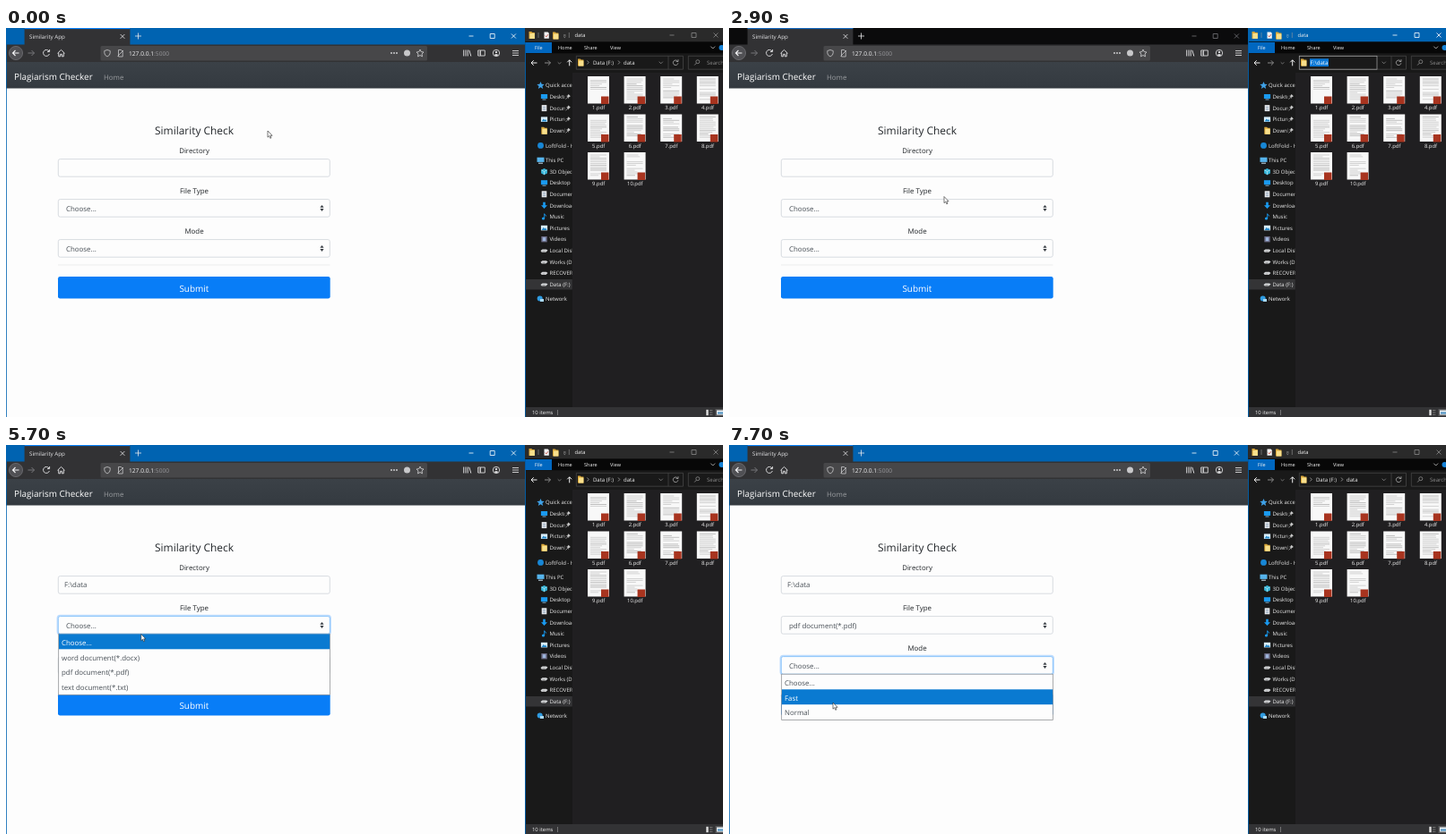
These frames come from a looping animation (800x435 px, 8 s). An HTML page:

```html
<!DOCTYPE html>
<html lang="en">
<head>
<meta charset="utf-8">
<title>Similarity App</title>
<style>
  html, body { margin: 0; width: 100%; height: 100%; overflow: hidden; background: #fdfdfd; }
  svg { display: block; width: 100vw; height: 100vh; }
  text { font-family: 'Open Sans', 'Noto Sans', sans-serif; text-rendering: geometricPrecision; white-space: pre; }
</style>
</head>
<body>
<svg id="stage" viewBox="0 0 800 435" preserveAspectRatio="none">
  <defs>
    <linearGradient id="nav" x2="0" y2="1"><stop stop-color="#3b4147"/><stop offset="1" stop-color="#343a40"/></linearGradient>
    <clipPath id="pane"><path d="M579 50H631.5V424H579Z"/></clipPath>
    <clipPath id="pinned"><path d="M579 50H623.5V424H579Z"/></clipPath>
  </defs>
</svg>
<script>
const stage = document.getElementById('stage');
const BLUE = '#0063b1', LIGHT = '#e8e8ea', INK = '#212529', GREY = '#495057';

function el(tag, attrs, parent = stage) {
  const n = document.createElementNS('http://www.w3.org/2000/svg', tag);
  set(n, attrs);
  parent.append(n);
  return n;
}
function set(n, attrs) { for (const k in attrs) n.setAttribute(k, attrs[k]); }
function show(n, on) { n.setAttribute('visibility', on ? 'visible' : 'hidden'); }
const group = (attrs = {}, parent) => el('g', attrs, parent);
const rect = (x, y, width, height, fill, parent, more) => el('rect', { x, y, width, height, fill, ...more }, parent);
const line = (d, stroke, parent, w = 0.8) => el('path', { d, stroke, fill: 'none', 'stroke-width': w }, parent);
const shape = (d, fill, parent) => el('path', { d, fill }, parent);
const dot = (cx, cy, r, fill, parent, more) => el('circle', { cx, cy, r, fill, ...more }, parent);
function text(x, y, str, size, fill, parent, anchor = 'start') {
  const n = el('text', { x, y, 'font-size': size, fill, 'text-anchor': anchor }, parent);
  n.textContent = str;
  return n;
}
function folder(x, y, parent) {
  shape(`M${x} ${y}h2.8l1 1h2.6v7h-6.4z`, '#d9a73a', parent);
  shape(`M${x + 1} ${y + 2}h5.4v6h-5.4z`, '#f9e08c', parent);
}
// minimise, maximise and close
function controls(x, y, gap, parent) {
  const g = group({ fill: 'none', 'stroke-width': 0.8 }, parent);
  el('path', { d: `M${x - 2.5} ${y}h5M${x + gap - 2.5} ${y - 2.5}h5v5h-5zM${x + 2 * gap - 2.5} ${y - 2.5}l5 5m0 -5l-5 5` }, g);
  return g;
}

// Browser
rect(0, 0, 579, 435, '#fdfdfd');
const webBar = rect(0, 0, 579, 19, BLUE);
rect(20.6, 0, 117.8, 19, '#323234');
const tabLine = rect(20.6, 0, 117.8, 1.1, '#0a84ff');
text(26, 11.6, 'Similarity App', 6.2, LIGHT);
line('M127.6 7l4.8 4.8m0-4.8l-4.8 4.8', LIGHT);
line('M147.5 5.5v7m-3.5-3.5h7', LIGHT);
const webControls = controls(519, 9, 23.7);
rect(0, 18.5, 579, 19.7, '#323234');
dot(11, 28, 7.6, '#505054', stage, { stroke: '#78787c', 'stroke-width': 0.7 });
line('M14.5 28h-7m3-3l-3 3l3 3', '#f4f4f6', stage, 1.1);
line('M24.5 28h7m-3-3l3 3l-3 3', '#77777b', stage, 1);
line('M48 26a3.5 3.5 0 1 0 .4 3M48.6 24v2.6h-2.6', '#d8d8da', stage, 1);
line('M57.5 28.3l4-3.9l4 3.9M58.7 27.6v4.2h1.9v-2.5h1.8v2.5h1.9v-4.2', '#d8d8da', stage, 1);
rect(105.5, 20, 364.5, 16.5, '#474749', stage, { rx: 1.5 });
line('M113 24.5l3.2 1v2.4q0 2.6-3.2 4.1q-3.2-1.5-3.2-4.1v-2.4z', '#c8c8ca');
line('M125.5 24.5h3l1.7 1.7v5.8h-4.7zM124.5 31.5l6.5-6.5', '#c8c8ca');
const url = text(137, 30.6, '127.0.0.1', 6.65, '#f4f4f6');
el('tspan', { fill: '#98989c' }, url).textContent = ':5000';
[430, 433, 436].forEach(x => dot(x, 28, 0.9, '#d8d8da'));
dot(447.5, 28, 3.5, '#c8c8ca');
line('M462 24l1.2 2.6l2.8.4l-2 2l.5 2.9l-2.5-1.4l-2.5 1.4l.5-2.9l-2-2l2.8-.4z', '#d8d8da');
line('M510.7 24.5v7M513 24.5v7M515.2 24.5v7M516.8 24.8l2 6.7', '#d8d8da', stage, 1);
line('M526.7 25h7.6v6h-7.6zM529.5 25v6M527.5 27h1.5M527.5 29h1.5', '#d8d8da', stage, 0.9);
dot(547, 28, 3.7, 'none', stage, { stroke: '#d8d8da', 'stroke-width': 0.9 });
dot(547, 26.9, 1.2, '#d8d8da');
shape('M544.7 30.3q2.3-2.6 4.6 0q-2.3 1.8-4.6 0z', '#d8d8da');
line('M565 25.5h7M565 28h7M565 30.5h7', '#d8d8da', stage, 0.9);
rect(0, 38, 579, 29.5, 'url(#nav)');
text(9, 58.2, 'Plagiarism Checker', 9.92, '#fff');
text(109, 57.5, 'Home', 7.9, '#9a9da0');

// Form
text(210, 118.6, 'Similarity Check', 11.93, INK, stage, 'middle');
[['Directory', 139.5], ['File Type', 184.6], ['Mode', 229.7]]
  .forEach(([s, y]) => text(210, y, s, 7.9, INK, stage, 'middle'));
line('M58 265h303.5', '#e4e5e6', stage, 0.7);
rect(58, 278, 303.7, 24.5, '#087df7', stage, { rx: 2.3 });
text(209.9, 294.7, 'Submit', 9.96, '#fff', stage, 'middle');

function field(y) {
  const halo = rect(57.6, y - 0.5, 304.4, 20.8, 'none', stage, { rx: 2.8, stroke: '#007bff', 'stroke-width': 2 });
  const box = rect(58.3, y + 0.3, 303, 19.6, '#fdfdfd', stage, { rx: 2.1, 'stroke-width': 0.8 });
  return { halo, box };
}
function picker(y) {
  const f = field(y);
  f.label = text(67, y + 13.3, 'Choose...', 7.9, GREY);
  shape(`M350.4 ${y + 9.4}l2.1-2.8l2.1 2.8zM350.4 ${y + 10.8}l2.1 2.8l2.1-2.8z`, '#343a40');
  return f;
}
const dirField = field(146.3), typeField = picker(191.3), modeField = picker(236.3);
const dirText = text(65, 159.3, 'F:\\data', 7.9, GREY);
const caret = rect(65, 151, 0.7, 10.5, '#222');

function list(y, items) {
  const g = group();
  rect(58.7, y, 302.7, items.length * 16.9 + 0.5, '#fdfdfd', g, { stroke: '#85888c', 'stroke-width': 0.7 });
  const bar = rect(59, 0, 302.2, 16.9, '#0a7ad1', g);
  const rows = items.map((s, i) => text(62, y + 12.4 + i * 16.9, s, 7.9, GREY, g));
  return (open, pointerY) => {
    show(g, open);
    const pick = Math.max(0, Math.floor((pointerY - y) / 16.9));
    set(bar, { y: y + 0.2 + pick * 16.9 });
    rows.forEach((r, i) => set(r, { fill: i === pick ? '#fff' : GREY }));
  };
}
const typeList = list(211.2, ['Choose...', 'word document(*.docx)', 'pdf document(*.pdf)', 'text document(*.txt)']);
const modeList = list(256.2, ['Choose...', 'Fast', 'Normal']);

// File manager
rect(579, 0, 221, 435, '#191919');
const webEdge = shape('M0 18h.8v417h-.8zM579 16h.9v419h-.9z', BLUE);
const expBar = rect(579, 0, 221, 15.5, BLUE);
rect(579.9, 15.5, 220.1, 12.8, '#070707');
folder(583.5, 4);
line('M594 5v6M628.3 5v6', '#9a9a9a', stage, 0.6);
shape('M600.5 4.5h4l1.3 1.3v6h-5.3z', '#f4f4f4');
line('M601.6 8.6l1.2 1.3l2-2.6', '#c0392b');
folder(610, 4.5);
line('M622 8h2.6M622.2 9.6l1.1 1l1.1-1', '#d0d0d0', stage, 0.6);
text(634.5, 10.2, 'data', 5.8, '#f0f0f0');
const expControls = controls(743, 8, 24.5);
rect(579.5, 16, 29.5, 12, '#0067c0');
[['File', 590], ['Home', 616], ['Share', 645], ['View', 674]].forEach(([s, x]) => text(x, 23.9, s, 5.5, '#f4f4f4'));
line('M786.3 20.6l2.4 2.4l2.4-2.4', '#c8c8c8');
dot(798.5, 22, 3, '#1683d8');
line('M592.5 39h-6.5m2.7-2.7l-2.7 2.7l2.7 2.7M628.7 42.3v-6.5m-2.5 2.5l2.5-2.5l2.5 2.5', '#f0f0f0', stage, 1);
line('M601 39h6.5m-2.7-2.7l2.7 2.7l-2.7 2.7', '#8a8a8a', stage, 1);
line('M615.7 38.3l1.8 1.8l1.8-1.8', '#999', stage, 0.7);
line('M636.3 31.3h119.2v14.9h-119.2zM739 31.3v14.9', '#4c4c4c', stage, 0.7);
line('M761.3 46.2v-14.9h40M761.3 46.2h40', '#4c4c4c', stage, 0.7);
folder(638, 34.5);
line('M728.6 37.7l2.1 2.1l2.1-2.1', '#9a9a9a', stage, 0.7);
line('M749.3 37a2.8 2.8 0 1 0 .6 2.3M750 35.2v2.3h-2.3', '#b0b0b0', stage, 0.8);
dot(771.8, 37.7, 2, 'none', stage, { stroke: '#9a9a9a', 'stroke-width': 0.7 });
line('M770.4 39.2l-2.2 2.3', '#9a9a9a', stage, 0.8);
text(782, 40.8, 'Search', 6, '#8c8c8c');

const crumbs = group();
line('M648.4 36.5l1.8 2l-1.8 2M683 36.5l1.8 2l-1.8 2', '#b8b8b8', crumbs, 0.7);
text(655, 40.8, 'Data (F:)', 6, '#f0f0f0', crumbs);
text(689, 40.8, 'data', 6, '#f0f0f0', crumbs);
const typed = group();
rect(636.3, 31.3, 86.7, 14.9, 'none', typed, { stroke: '#a8a8a8', 'stroke-width': 0.7 });
rect(648, 34.3, 21, 8.8, '#0b78d7', typed);
text(648.6, 40.8, 'F:\\data', 6.15, '#fff', typed);

rect(632, 50, 168, 374, '#201f21');
rect(579.9, 281, 51.9, 11.5, '#343436');

const side = group({ 'clip-path': 'url(#pane)' });
const pins = group({ 'clip-path': 'url(#pinned)' });
const icons = {
  star: (x, y) => shape(`M${x} ${y - 4}l1.2 2.8l3 .2l-2.3 2l.8 3l-2.7-1.7l-2.7 1.7l.8-3l-2.3-2l3-.2z`, '#3fa2e8', side),
  screen: (x, y) => { rect(x - 3.6, y - 3, 7.2, 5, '#1a9af0', side); line(`M${x - 2} ${y + 3}h4`, '#9fd4f7', side); },
  page: (x, y) => { rect(x - 2.8, y - 3.5, 5.6, 7, '#e6e9ec', side); line(`M${x - 1.6} ${y - 1.4}h3.2m-3.2 1.6h3.2m-3.2 1.6h3.2`, '#6f8ca8', side, 0.6); },
  photo: (x, y) => { rect(x - 3.6, y - 2.8, 7.2, 5.6, '#d9eefa', side); shape(`M${x - 3} ${y + 2.3}l2.2-3l1.5 1.6l1-1l1.4 2.4z`, '#2488c9', side); },
  folder: (x, y) => folder(x - 3.2, y - 4, side),
  cloud: (x, y) => dot(x, y, 3.4, '#1787d6', side),
  pc: (x, y) => { rect(x - 4, y - 3.3, 8, 5.2, '#56b4ec', side); line(`M${x - 2.5} ${y + 3.2}h5`, '#c8e4f4', side, 1); },
  cube: (x, y) => { shape(`M${x} ${y - 3.7}l3.4 1.8v3.8l-3.4 1.8l-3.4-1.8v-3.8z`, '#36b5d8', side); line(`M${x - 3.2} ${y - 1.8}l3.2 1.7l3.2-1.7M${x} ${y}v3.6`, '#d5f3fa', side, 0.6); },
  down: (x, y) => shape(`M${x - 1.3} ${y - 3.7}h2.6v3.5h2.2l-3.5 3.7l-3.5-3.7h2.2z`, '#1a9af0', side),
  note: (x, y) => { dot(x - 1, y + 2, 1.6, '#1a9af0', side); line(`M${x + 0.2} ${y + 2}v-5.3q.4 1.8 2.4 2.6`, '#1a9af0', side, 0.9); },
  film: (x, y) => { rect(x - 3.2, y - 3.2, 6.4, 6.4, '#6d6d86', side); rect(x - 1.7, y - 2, 3.4, 4, '#9db5dc', side); },
  disk: (x, y) => { shape(`M${x - 4} ${y + 0.3}l2-1.5h4.4l1.6 1.2l-2.2 2h-4.6z`, '#d4d6d8', side); line(`M${x - 2} ${y + 1}h3`, '#777', side, 0.6); },
  net: (x, y) => { dot(x - 0.8, y - 0.6, 3, '#2f9be0', side); rect(x - 0.5, y, 4, 3, '#a9d8f2', side); },
};
const places = [
  ['star', 64, 'Quick access', 'root'], ['screen', 77, 'Desktop', 'pin'], ['page', 89.6, 'Documents', 'pin'],
  ['photo', 102.2, 'Pictures', 'pin'], ['folder', 114.8, 'Downloads', 'pin'], ['cloud', 131.4, 'LoftFold - Home', 'root'],
  ['pc', 148, 'This PC', 'root'], ['cube', 160.6, '3D Objects'], ['screen', 173.2, 'Desktop'], ['page', 185.8, 'Documents'],
  ['down', 198.4, 'Downloads'], ['note', 211, 'Music'], ['photo', 223.6, 'Pictures'], ['film', 236.2, 'Videos'],
  ['disk', 248.8, 'Local Disk (C:)'], ['disk', 261.4, 'Works (D:)'], ['disk', 274, 'RECOVERY (E:)'],
  ['disk', 286.6, 'Data (F:)'], ['net', 303, 'Network', 'root'],
];
for (const [icon, y, name, kind] of places) {
  const root = kind === 'root', pin = kind === 'pin';
  icons[icon](root ? 596.5 : 600.5, y);
  text(root ? 602 : 606.5, y + 2.2, name, 6, '#ececec', pin ? pins : side);
  if (pin) {
    line(`M624.6 ${y + 2.6}l2.2-2.2M625.4 ${y - 1}l2.6 2.6`, '#c8c8c8', side, 0.7);
    shape(`M626 ${y - 0.8}l1.6-2.2l2.2 2.2l-2.2 1.6z`, '#c8c8c8', side);
  }
}

let seed = 7;
const rnd = () => (seed = seed * 16807 % 2147483647) / 2147483647;
for (let i = 0; i < 10; i++) {
  const x = 649 + (i % 4) * 40.6, y = 54 + Math.floor(i / 4) * 42.5;
  rect(x, y, 24, 30.5, '#f8f8f8');
  const rows = i === 0 ? 7 : 13;
  for (let r = 0; r < rows; r++) {
    if (rnd() < 0.13) continue;
    const w = rnd() < 0.7 ? 18 : 8 + rnd() * 9;
    line(`M${x + 3} ${y + 3 + r * 1.9}h${w}`, rnd() < 0.3 ? '#999' : '#b9b9b9', stage, 0.6);
  }
  rect(x + 15, y + 22.5, 8.5, 8.5, '#a8341f');
  text(x + 12.2, y + 37.3, `${i + 1}.pdf`, 5.9, '#f0f0f0', stage, 'middle');
}
rect(579.9, 424, 220.1, 11, '#333335');
text(587, 432.3, '10 items', 5.9, '#f0f0f0');
line('M615.5 427v6', '#a0a0a0', stage, 0.6);
rect(781.3, 426.8, 2.4, 6.4, '#e0e0e0');
line('M785 427.5h3.4m-3.4 2.4h3.4m-3.4 2.4h3.4', '#9a9a9a', stage, 0.6);
rect(791.5, 426, 8.5, 8, '#5a5a5c');
rect(793, 427.5, 7, 5, '#e8eef2');
rect(794, 429.5, 6, 2, '#4a90c2');
const expEdge = rect(579, 0, 0.9, 435, BLUE);

// Pointer
const arrow = el('path', { d: 'M0 0v7.2l1.7-1.5l1.1 2.6l1.2-.5l-1.1-2.5h2.2z', fill: '#fff', stroke: '#222', 'stroke-width': 0.6 });
const beam = el('path', { d: 'M-1.5-3.7h3M-1.5 3.7h3M0-3.7v7.4', 'stroke-width': 0.8 });

// [ms, x, y]
const path = [
  [0, 292, 115], [100, 264, 128], [200, 226, 147], [300, 217, 151], [400, 250, 139], [500, 360, 100],
  [600, 520, 55], [700, 645, 28], [800, 699, 25], [900, 711, 41.5], [2300, 711, 41.5], [2400, 716, 50],
  [2500, 690, 66], [2600, 600, 100], [2700, 450, 150], [2800, 310, 183], [2900, 240, 188.5], [3000, 205, 176],
  [3100, 180, 163], [3200, 169.5, 156], [4400, 169.5, 156], [4800, 153, 201], [5600, 153, 201],
  [5800, 148.5, 222], [5900, 145, 239], [6000, 142, 248], [6500, 142, 248], [6600, 140, 254],
  [6700, 139, 251.5], [7200, 139, 251.5], [7400, 133, 262], [7600, 119, 283], [7700, 116, 288],
];
const typeGlow = [[5000, 0], [5200, 1], [6900, 1], [7000, 0.9], [7200, 0]];
const modeGlow = [[7000, 0], [7200, 1]];
const dirGlow = [[3300, 0], [3500, 1], [4900, 1], [5000, 0.5], [5100, 0]];

function at(keys, t, col = 1) {
  if (t <= keys[0][0]) return keys[0][col];
  for (let i = 1; i < keys.length; i++) {
    const a = keys[i - 1], b = keys[i];
    if (t <= b[0]) return a[col] + (b[col] - a[col]) * (t - a[0]) / (b[0] - a[0]);
  }
  return keys[keys.length - 1][col];
}
const within = (t, a, b) => t >= a && t < b;
const mix = (a, b, k) => Math.round(a + (b - a) * k);
function glow(f, k) {
  set(f.halo, { 'stroke-opacity': 0.25 * k });
  set(f.box, { stroke: `rgb(${mix(206, 120, k)},${mix(212, 186, k)},${mix(218, 250, k)})` });
}

function draw(t) {
  const x = at(path, t), y = at(path, t, 2);
  const files = within(t, 1000, 3300), editing = within(t, 1100, 3300);

  set(webBar, { fill: files ? '#0b0b0c' : BLUE });
  set(webControls, { stroke: files ? '#77777a' : '#fff' });
  set(tabLine, { opacity: files ? 0.7 : 1 });
  show(webEdge, !files);
  set(expBar, { fill: files ? BLUE : '#2a2a2a' });
  set(expControls, { stroke: files ? '#fff' : '#8a8a8a' });
  show(expEdge, files);
  show(crumbs, !editing);
  show(typed, editing);

  show(dirText, t >= 4200);
  show(caret, within(t, 3300, 3800) || within(t, 4200, 4700));
  set(caret, { x: t < 4200 ? 65 : 91 });
  glow(dirField, at(dirGlow, t));
  glow(typeField, at(typeGlow, t));
  glow(modeField, at(modeGlow, t));
  typeField.label.textContent = t < 6400 ? 'Choose...' : 'pdf document(*.pdf)';
  typeList(within(t, 5000, 6400), y);
  modeList(t >= 6900, y);

  const inField = x < 361 && y > 146 && y < 166.5 && x > 58;
  const inPath = x > 648 && x < 723 && y > 31 && y < 46 && t >= 900;
  const typing = inField || inPath;
  show(arrow, !typing);
  show(beam, typing);
  set(beam, { stroke: inPath ? '#e8e8e8' : '#222' });
  [arrow, beam].forEach(n => set(n, { transform: `translate(${x} ${y})` }));
}

const start = performance.now();
function tick(now) {
  const t = Math.max(0, now - start) % 8000;
  draw(Math.floor(t / 100) * 100);
  requestAnimationFrame(tick);
}
draw(0);
requestAnimationFrame(tick);
</script>
</body>
</html>
```
